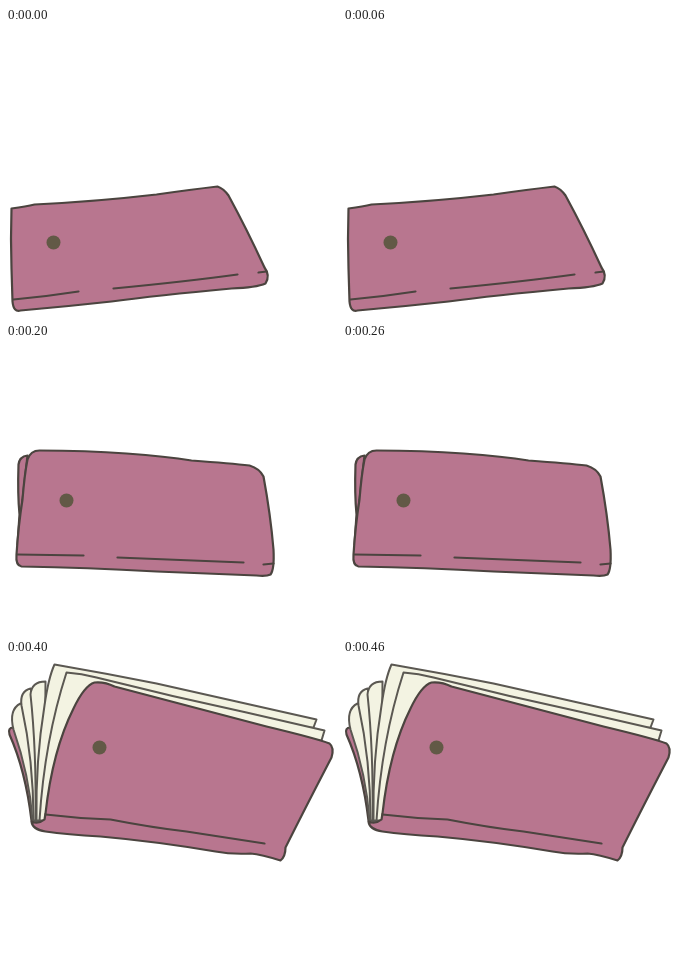
Recreate the animation shown at these times as an HTML page. Size 331x288 px, loop 500 ms.

```html
<!DOCTYPE html>
<html lang="en">
<head>
<meta charset="utf-8">
<title>Opening book</title>
<style>
  html, body { margin: 0; width: 100%; height: 100%; overflow: hidden; background: #fff; }
  svg { display: block; width: 100vw; height: 100vh; }
  path { stroke: #4b443f; stroke-width: 2.2; stroke-linecap: round; stroke-linejoin: round; }
  .cover { fill: #b8768f; }
  .page { fill: #f3f3e2; stroke: #5b5852; stroke-width: 2; }
  .line { fill: none; }
  .mark { fill: #625946; }
</style>
</head>
<body>
<svg id="stage" viewBox="-.5 -.5 331 288">
  <g>
    <path class="cover" d="M5 180Q20 178 28 176Q90 173 150 166Q185 161 211 158Q217 160 222 167Q240 200 258 239Q264 247 259 255Q250 259 225 260Q150 267 105 273Q60 278 14 282Q7 284 6 273L5 240Q4 210 5 180Z"/>
    <path class="line" d="M7 271Q40 268 72 263M107 260Q180 253 231 246M252 244L260 243"/>
    <circle class="mark" cx="47" cy="214" r="7"/>
  </g>
  <g>
    <path class="cover" d="M17 152Q30 152 42 150Q80 153 110 153Q170 154 224 152Q231 156 235 163Q250 203 263 241Q265 248 256 254Q200 253 160 254Q80 256 14 255Q7 254 7 243Q8 210 12 180Q13 155 17 152Z"/>
    <path class="line" d="M8 243Q40 241 74 241M109 242L235 241M255 242L262 241"/>
    <circle class="mark" cx="55" cy="191" r="7"/>
  </g>
  <g>
    <path class="cover" d="M21 111Q13 112 12 120Q11 150 13 170L11 200Z"/>
    <path class="cover" d="M21 115Q24 106 33 106Q80 106 120 109Q160 112 185 116Q225 119 243 121Q253 124 257 132Q264 170 267 205Q268 225 264 230Q260 232 250 231Q200 229 150 227Q80 223 15 222Q9 221 10 210Q12 180 16 155Q18 130 21 115Z"/>
    <path class="line" d="M11 210L77 211M111 213L237 218M257 220L267 219"/>
    <circle class="mark" cx="60" cy="156" r="7"/>
  </g>
  <g>
    <path class="cover" d="M19 51Q11 52 11 60Q10 115 13 165L20 110Z"/>
    <path class="page" d="M14 160Q19 105 18 60Q18 45 26 43Q60 41 78 43L105 46Q150 48 190 54L270 64Q276 66 277 73L60 90Z"/>
    <path class="page" d="M14 165Q23 100 27 62Q30 42 42 42Q60 41 78 43L105 46Q150 48 190 54L270 64Q276 66 277 73L60 90Z"/>
    <path class="page" d="M14 170Q25 105 38 65Q42 51 53 51Q100 54 150 59Q220 67 276 73Q287 75 288 84L60 100Z"/>
    <path class="cover" d="M13 173Q25 115 46 69Q50 59 58 58Q100 62 150 67Q230 78 290 86Q302 87 302 92Q300 100 296 106Q283 150 272 190Q270 202 262 208Q200 205 150 199Q80 191 20 188Q13 187 13 175Z"/>
    <path class="line" d="M14 175L80 179M114 183Q180 188 240 194M260 197L269 196"/>
    <circle class="mark" cx="70" cy="123" r="7"/>
  </g>
  <g>
    <path class="cover" d="M7 67Q1 67 3 74Q19 110 25 160L29 130Q18 95 7 67Z"/>
    <path class="page" d="M26 160Q23 115 7 69Q2 49 14 43L20 47L30 160Z"/>
    <path class="page" d="M27 160Q27 100 15 45Q13 31 24 28L29 40L32 160Z"/>
    <path class="page" d="M29 160Q30 90 24 34Q25 21 39 21L38 160Z"/>
    <path class="page" d="M30 160Q29 100 38 45Q42 17 48 4Q100 13 150 23L230 41L310 59L307 67L80 90L36 160Z"/>
    <path class="page" d="M33 160Q38 80 60 12Q75 13 90 17Q165 36 240 52L318 70L315 80L90 90L38 160Z"/>
    <path class="cover" d="M39 153Q46 90 67 48Q78 25 88 22Q98 21 108 26Q200 50 260 66Q310 78 323 83Q328 87 325 97Q300 145 279 187Q279 196 274 200Q255 194 244 193Q225 194 209 191Q150 181 94 176Q60 174 39 171Q26 169 25 161Q32 164 38 159Z"/>
    <path class="line" d="M39 154Q72 158 104 159Q145 167 180 171L258 183"/>
    <circle class="mark" cx="93" cy="87" r="7"/>
  </g>
</svg>
<script>
  const STEP = 100;
  const poses = [...document.querySelectorAll('#stage > g')];

  function draw() {
    const current = Math.floor(performance.now() / STEP) % poses.length;
    poses.forEach((pose, i) => { pose.style.display = i === current ? '' : 'none'; });
    requestAnimationFrame(draw);
  }
  draw();
</script>
</body>
</html>
```
